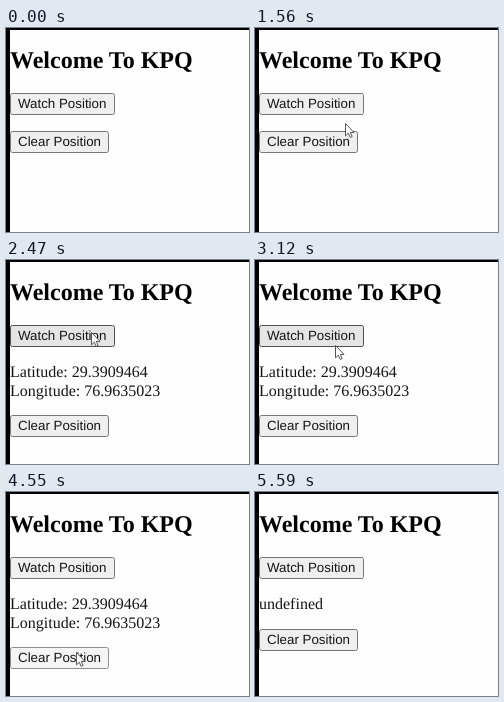
Recreate the animation shown at these times as an HTML page. Size 243 px wide and 204 px high, loop 6240 ms.

```html
<!DOCTYPE html>
<html lang="en">
<head>
<meta charset="utf-8">
<title>Watch position</title>
<style>
  html, body { margin: 0; width: 100%; height: 100%; overflow: hidden; background: #fefefe; }
  svg { display: block; width: 243px; height: 204px; }
  text { fill: #141414; font: 16px "Liberation Serif", "Times New Roman", serif; text-rendering: geometricPrecision; }
  .title { fill: #000; font-size: 24px; font-weight: bold; }
  .button text { font: 13.333px "Liberation Sans", Arial, sans-serif; }
  .button rect { fill: #efefef; stroke: #767676; }
  .button.hover rect { fill: #e5e5e5; stroke: #4f4f4f; }
  .button.active rect { fill: #f5f5f5; stroke: #8d8d8d; }
</style>
</head>
<body>
<svg viewBox="0 0 243 204">
  <rect width="243" height="204" fill="#000"/>
  <rect x="4" y="2" width="239" height="202" fill="#fefefe"/>
  <text class="title" x="4" y="39.6">Welcome To KPQ</text>
  <g id="watch" class="button">
    <rect x="4.5" y="65.5" width="104" height="21" rx="2"/>
    <text x="12" y="80.3">Watch Position</text>
  </g>
  <text id="line1" x="4" y="117.3"></text>
  <text id="line2" x="4" y="135.7"></text>
  <g id="clear" class="button">
    <rect x="4.5" y=".5" width="98" height="21" rx="2"/>
    <text x="12" y="15.3">Clear Position</text>
  </g>
  <path id="cursor" d="M.5 .5V12.8L3.3 10.2L5.2 14.4L7.1 13.5L5.3 9.4H9Z"
        fill="#fff" stroke="#444" stroke-width=".9" stroke-linejoin="round"/>
</svg>
<script>
const LOOP = 6240, STEP = 130;
const PRESS_WATCH = 2210, SHOW_POSITION = 2470;
const PRESS_CLEAR = 4550, SHOW_CLEARED = 4810;

// Pointer stops: time, x, y
const path = [
  [260, 116, 197], [780, 101, 174], [910, 100, 168], [1430, 92, 106],
  [1820, 85, 72], [2730, 85, 72], [3120, 80, 85], [3380, 75, 138],
  [3510, 74, 152], [3770, 74, 152], [4030, 72, 153], [4290, 70, 160],
  [5070, 70, 160], [5590, 76, 208]
];

const [watch, clear, line1, line2, cursor] =
  ["watch", "clear", "line1", "line2", "cursor"].map(id => document.getElementById(id));

function pointerAt(t) {
  const i = path.findIndex(stop => stop[0] > t);
  if (i < 1) return null;
  const [t0, x0, y0] = path[i - 1], [t1, x1, y1] = path[i];
  const k = (t - t0) / (t1 - t0);
  return { x: x0 + (x1 - x0) * k, y: y0 + (y1 - y0) * k };
}

function setButton(el, pointer, top, width, pressed) {
  const hover = pointer && pointer.x >= 4 && pointer.x < 4 + width &&
    pointer.y >= top && pointer.y < top + 22;
  el.setAttribute("class", "button" + (pressed ? " active" : hover ? " hover" : ""));
}

function draw(now) {
  const t = Math.floor((now % LOOP) / STEP) * STEP;
  const pointer = pointerAt(t);
  const located = t >= SHOW_POSITION && t < SHOW_CLEARED;
  const cleared = t >= SHOW_CLEARED;
  const clearTop = located ? 155 : cleared ? 137 : 103;

  line1.textContent = located ? "Latitude: 29.3909464" : cleared ? "undefined" : "";
  line2.textContent = located ? "Longitude: 76.9635023" : "";
  clear.setAttribute("transform", `translate(0 ${clearTop})`);
  setButton(watch, pointer, 65, 105, t >= PRESS_WATCH && t < PRESS_WATCH + STEP);
  setButton(clear, pointer, clearTop, 99, t >= PRESS_CLEAR && t < SHOW_CLEARED);

  cursor.style.display = pointer ? "" : "none";
  if (pointer) {
    cursor.setAttribute("transform", `translate(${Math.round(pointer.x)} ${Math.round(pointer.y)})`);
  }
}

const start = performance.now();
function tick() {
  draw(performance.now() - start);
  requestAnimationFrame(tick);
}
tick();
</script>
</body>
</html>
```
